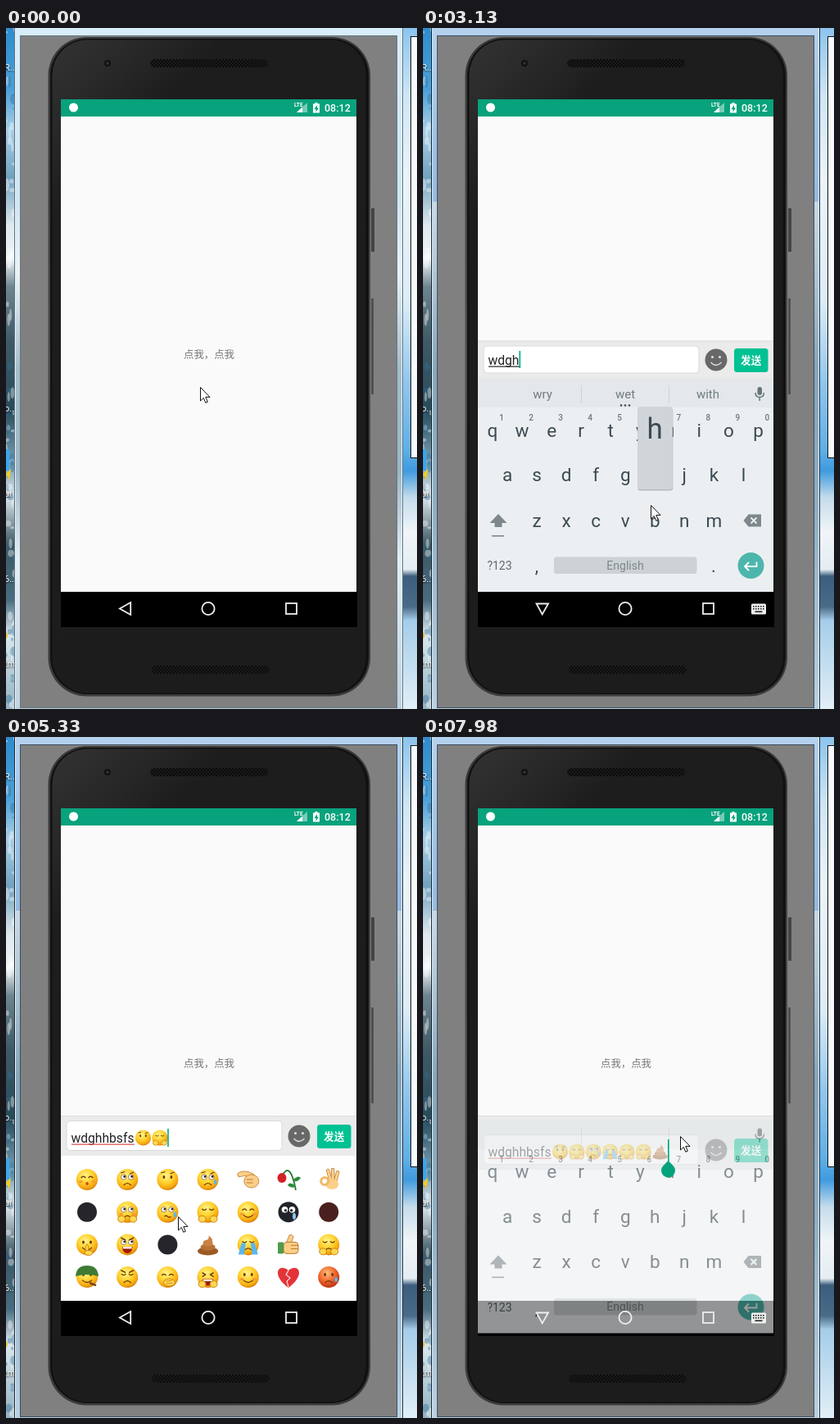
An HTML page that plays this animation: 502x831 px, repeating every 8 s.

```html
<!DOCTYPE html>
<html lang="zh">
<head>
<meta charset="utf-8">
<style>
html, body { margin: 0; width: 100%; height: 100%; overflow: hidden; background: #808080; }
svg { display: block; width: 502px; height: 831px; font-family: Roboto, "Noto Sans CJK SC", "Noto Sans CJK", sans-serif; }
</style>
</head>
<body>
<svg viewBox="0 0 502 831"><defs id="defs"></defs><g id="desk"></g><g id="phone"></g><g id="live"></g></svg>
<script>
const $ = id => document.getElementById(id);

// Shape helpers
const rect = (x, y, w, h, fill, more = '') => `<rect x="${x}" y="${y}" width="${w}" height="${h}" fill="${fill}" ${more}/>`;
const disc = (x, y, r, fill, more = '') => `<circle cx="${x}" cy="${y}" r="${r}" fill="${fill}" ${more}/>`;
const oval = (x, y, rx, ry, fill, more = '') => `<ellipse cx="${x}" cy="${y}" rx="${rx}" ry="${ry}" fill="${fill}" ${more}/>`;
const shape = (d, fill, more = '') => `<path d="${d}" fill="${fill}" ${more}/>`;
const line = (d, color, w = 1, more = '') => shape(d, 'none', `stroke="${color}" stroke-width="${w}" ${more}`);
const text = (x, y, s, size, fill, more = '') => `<text x="${x}" y="${y}" font-size="${size}" fill="${fill}" ${more}>${s}</text>`;
const mid = 'text-anchor="middle"';
const group = (s, more) => `<g ${more}>${s}</g>`;
const stops = s => s.split(' ').map(p => p.split('@')).map(([c, o]) => `<stop offset="${o}%" stop-color="${c}"/>`).join('');
const fade = (id, s, dir = 'x2="0" y2="1"') => `<linearGradient id="${id}" ${dir}>${stops(s)}</linearGradient>`;
const glow = (id, s) => `<radialGradient id="${id}" cx=".42" cy=".32" r=".7">${stops(s)}</radialGradient>`;

// Emoji, drawn around 0,0 with a radius of 13
const ink = '#6a3200';
const both = f => f(-4.5) + f(4.5);
const hand = (x, y, rx, ry) => oval(x, y, rx, ry, '#ffd84f', 'stroke="#c77a10" stroke-width=".9"');
const eyes = {
  o: both(x => oval(x, -3, 1.4, 2, ink)),
  w: both(x => disc(x, -3, 3.2, '#fff', `stroke="${ink}" stroke-width=".6"`) + disc(x + 1, -3.6, 1.4, '#222')),
  u: both(x => line(`M${x - 2.8} -2q2.8 -3.6 5.6 0`, ink, 1.3)),
  v: both(x => line(`M${x - 2.8} -4q2.8 3.2 5.6 0`, ink, 1.3)),
  x: line('M-7 -5.5l4 2.5l-4 2.5M7 -5.5l-4 2.5l4 2.5', ink, 1.4)
};
const mouths = {
  s: line('M-6 3.5q6 6 12 0', ink, 1.2),
  f: line('M-4.5 7q4.5 -5 9 0', ink, 1.2),
  k: oval(0, 5, 1.8, 2, '#d5461d'),
  l: line('M-4 5.5q2 -2 4 0t4 0', ink, 1.2),
  O: shape('M-6.5 2.5h13q-1 8 -6.5 8t-6.5 -8z', '#a3190c') + rect(-5.5, 2.8, 11, 2.2, '#fff'),
  n: ''
};
const extras = {
  h: hand(2, 6.5, 7, 4.5) + line('M-2 5l8 -1M-2 8l8 -1', '#c77a10', .8),
  H: hand(-7, 8.5, 4.5, 4) + hand(7, 8.5, 4.5, 4),
  i: hand(0, 6, 1.8, 6.5) + hand(2, 10, 5, 3),
  b: line('M-8 -8l5 -1.5M3 -7l5 -2', ink, 1.2),
  a: line('M-8 -8.5l6 3M8 -8.5l-6 3', ink, 1.5),
  d: oval(9, 3, 1.8, 3, '#5cb8ee'),
  t: shape('M-8 -2h5l-2 14h-7zM8 -2h-5l2 14h7z', '#59b8ee'),
  c: both(x => oval(x * 1.7, 2.5, 2.4, 1.6, '#f59a35')),
  g: shape('M-14 -1q1 -13 14 -13t14 13q-14 -4 -28 0z', '#3f7a35') + line('M3 7l8 3', '#704020', 2.4),
  r: ''
};
const face = code => disc(0, 0, 13, `url(#${code.includes('r') ? 'hot' : 'sun'})`) +
  eyes[code[0]] + mouths[code[1]] + [...code.slice(2)].map(c => extras[c]).join('');
const skin = (d, w) => line(d, '#b97830', w + 1.4, 'stroke-linecap="round"') + line(d, '#fbcf88', w, 'stroke-linecap="round"');
const objects = {
  FIST: skin('M-10 -6Q-4 -9 4 -5', 5) + oval(4, 2, 9, 8, '#fbcf88', 'stroke="#b97830" stroke-width=".8"') + line('M-2 0h8M-2 4h8', '#b97830'),
  ROSE: line('M-8 -4Q2 -24 9 13', '#267a38', 1.8) + shape('M6 0q6 -6 9 -2q-3 5 -8 4zM8 7q-7 -5 -9 0q4 4 9 2z', '#2c8a3e') + oval(-8, -2, 5.5, 6, '#d42027'),
  OK: skin('M2 0L-1 -11M5 0L5 -12M8 2L11 -9', 3) + oval(4, 6, 8, 6, '#fbcf88') + disc(-5, 2, 4.5, 'none', 'stroke="#f2b768" stroke-width="3"'),
  DARK: disc(0, 0, 12, '#25252b'),
  RUST: disc(0, 0, 12, '#49201d'),
  BALL: disc(0, 0, 12.5, '#20242a') + both(x => disc(x, -3, 3.8, '#fff') + disc(x * .8, -2, 1.6, '#111')) + oval(7, 5, 2, 4, '#8ec8ef'),
  POOP: oval(0, 8, 12.5, 5, '#9b5a24') + oval(0, 3, 9, 4.5, '#b87034') + oval(0, -2, 6, 4, '#c98242') + shape('M-4 -4Q2 -6 1 -11Q8 -6 4 -3z', '#c98242'),
  THUMB: skin('M0 -1L3 -9', 5) + rect(-6, -3, 18, 14, '#fbcf88', 'rx="4" stroke="#b97830"') + line('M3 1h9M3 5h9', '#b97830') + rect(-13, -3, 7, 14, '#4f9b4a', 'rx="1"'),
  HEART: shape('M0 13C-22 -3 -12 -18 0 -8C12 -18 22 -3 0 13z', '#e33438') + line('M0 -8l-3 5l5 4l-4 4l2 7', '#fbe3e3', 1.2),
  KID: rect(-8, 1, 16, 12, '#36a53c', 'rx="4"') + line('M-11 4H11', '#36a53c', 5, 'stroke-linecap="round"') + disc(0, -5, 8, 'url(#sun)') + both(x => disc(x / 2, -6, 1, ink))
};
const cells = ('ukc wfb ohb wfbd FIST ROSE OK DARK wfHc wld vhH usc BALL RUST osi wOa DARK POOP vft THUMB vfH ' +
  'osg vfa ulh xOH osc HEART ofrd ofar wOb uOc KID osH xOH wlad').split(' ');
const GIGGLE = 10, POOP = 17;
const inserted = [[30, 2], [31, GIGGLE], [34, 9], [36, 18], [41, GIGGLE], [43, GIGGLE], [45, POOP]];

$('defs').innerHTML =
  glow('sun', '#fff58c@0 #ffd12e@50 #f5a810@82 #cf7c08@100') +
  glow('hot', '#ffbf80@0 #f0662e@55 #b92f12@100') +
  fade('left', '#2f8ccd@0 #4ba0d8@9 #a9cfe6@15 #71a2bf@22 #dfe9ee@29 #eef3f5@34 #6d8590@38 #3f5a66@46 #284c5c@56 #6e97aa@63 #d8e3e8@69 #3c5764@76 #486d80@84 #dbe8ee@89 #93b2c2@100') +
  fade('right', '#8cc4ee@0 #cfe6f7@10 #eaf4fa@22 #dcedf8@40 #92c6ee@52 #5fafe6@62 #3f9ade@65 #c5dcec@69 #f0f5f8@74 #e4edf3@79.5 #3c5d7c@80.5 #4a6b88@85 #a5cde9@87 #e2eff7@100') +
  fade('idle', '#d8edfa@0 #cfe5f2@25 #eaf2f6@36 #a5bdca@50 #9eb6c5@65 #e3eef4@78 #bfd3df@100') +
  fade('busy', '#b4d1ee@0 #9dc2e6@15 #94bae0@25.5 #c8d9e6@25.5 #b3c8d6@35 #86a6bb@50 #8fadc1@70 #b9d1e2@100') +
  fade('body', '#333@0 #262626@14 #1d1d1d@22 #1c1c1c@100', 'x2=".5" y2="1"') +
  fade('edge', '#383838@0 #4a4a4a@50 #3a3a3a@100') +
  `<pattern id="mesh" width="4" height="4" patternUnits="userSpaceOnUse">${rect(0, 0, 4, 4, '#0c0c0c')}${disc(1, 1, .7, '#333')}${disc(3, 3, .7, '#333')}</pattern>` +
  `<clipPath id="screen">${rect(67, 87, 361, 644, '#fff')}</clipPath><clipPath id="grid">${rect(67, 520, 361, 159, '#fff')}</clipPath>` +
  cells.map((c, i) => group(objects[c] || face(c), `id="e${i}"`)).join('');

// Desktop and window frame
let seed = 7;
const random = () => (seed = seed * 16807 % 2147483647) / 2147483647;
const snow = Array.from({ length: 70 }, () =>
  oval(random() * 11, random() * 831, 1 + random() * 3, 1 + random() * 7, random() < .6 ? '#fff' : '#2c6f99', 'opacity=".4"')).join('');
const label = (y, s) => text(-2, y, s, 11, '#fff', 'style="text-shadow:0 1px 2px #000"');
const desk = active => rect(0, 0, 11, 831, 'url(#left)') + snow + rect(485, 0, 17, 831, 'url(#right)') +
  rect(-4, 514, 8, 26, '#39a7ef') + shape('M0 544l6 -6l-2 14z', '#f5cc1e') + disc(-3, 741, 5, '#f0bd28') +
  label(52, 'R..') + label(468, 'o..') + label(572, 'ar') + label(676, '6..') + label(780, 'tm') +
  rect(494.5, 10.5, 12, 514, '#f7fafc', 'stroke="#111"') +
  rect(10, 0, 475, 831, `url(#${active ? 'busy' : 'idle'})`) +
  line('M10.5 0V831M484.5 0V831', active ? '#1d2a35' : '#5d7482') +
  line('M11.5 0V831M483.5 0V831', '#e8f4fb') +
  rect(17.5, 9.5, 460, 820, '#808080', `stroke="${active ? '#3d4d5c' : '#66757f'}"`);

// Device and status bar
$('phone').innerHTML =
  rect(446, 220, 4, 53, '#444') + rect(446, 330, 3, 117, '#505050') +
  rect(51.5, 11, 393.5, 804.5, 'url(#edge)', 'rx="47"') +
  rect(54, 13, 389, 800, '#111', 'rx="45"') +
  rect(56.5, 14.5, 383, 797, 'url(#body)', 'rx="43"') +
  disc(124, 43, 4, '#111') + disc(124, 43, 1.8, '#343434') +
  rect(176, 38, 144, 10, 'url(#mesh)', 'rx="5"') + rect(178, 778, 144, 10, 'url(#mesh)', 'rx="5"') +
  rect(67, 87, 361, 21, '#08a27c') + rect(67, 108, 361, 580, '#fafafa') + rect(67, 688, 362, 43, '#000') +
  disc(82.5, 97, 5.5, '#fff') +
  text(352, 96, 'LTE', 6.5, '#fff', 'font-weight="700"') +
  shape('M355 103L368 91V103z', '#fff', 'opacity=".45"') + shape('M355 103L362 96.5V103z', '#fff') +
  shape('M375 92.5h2.5v-1.5h3v1.5h2.5v11h-8z', '#fff') + shape('M380 94l-3.5 5h2v3.5l3.5 -5h-2z', '#08a27c') +
  text(389, 102, '08:12', 12.5, '#fff', 'font-weight="500"') +
  text(217, 402.5, '点我，点我', 12.4, '#777');

// Soft keyboard
const rows = [['qwertyuiop', 85, 491], ['asdfghjkl', 103, 545.5], ['zxcvbnm', 139, 601]];
const keyAt = {};
rows.forEach(([keys, x, y]) => [...keys].forEach((k, i) => keyAt[k] = [x + 36.05 * i, y]));
const dark = '#3b4a52', soft = '#7d878c';
const keyboard = (words, popup) => {
  let s = rect(67, 427, 361, 261, '#eceff1') + rect(67, 427, 361, 36, '#e4e8ea') +
    line('M193.5 436V458M300.5 436V458', '#cdd3d6') +
    rect(408.5, 438, 5.5, 10, '#69757b', 'rx="2.7"') + line('M406 445q0 5.5 5.2 5.5t5.2 -5.5M411.2 450.5V455', '#69757b', 1.5);
  if (words) s += ['wry', 'wet', 'with'].map((w, i) => text(146 + 101 * i, 452, w, 15, '#707c82', mid)).join('') +
    [242, 247, 252].map(x => disc(x, 460.5, 1.3, dark)).join('');
  for (const k in keyAt) s += text(keyAt[k][0], keyAt[k][1] + 7.5, k, 22.5, dark, mid);
  for (let i = 0; i < 10; i++) s += text(96 + 36.05 * i, 479, (i + 1) % 10, 10, '#6d797f', mid + ' font-weight="500"');
  s += shape('M92 593L102.5 604H96.5V609H87.5V604H81.5z', soft) + rect(84, 619, 15, 1.6, soft) +
    shape('M391.5 601L397.5 593.5H413V608.5H397.5z', soft) + line('M400.5 597.5l7 7m0 -7l-7 7', '#eceff1', 1.8) +
    text(93.5, 661, '?123', 14, '#5c686e', mid) + text(139, 664, ',', 22, dark, mid) + text(355, 664, '.', 22, dark, mid) +
    rect(160, 645.5, 174.5, 20.5, '#cdd2d4', 'rx="3"') + text(247, 660.5, 'English', 14, soft, mid) +
    disc(400.5, 656, 16, '#4db6ac') + line('M407.5 651.5V657H393.5M398 652l-5 5l5 5', '#fff', 1.8);
  if (popup) {
    const [x, y] = keyAt[popup];
    s += rect(x - 21, y - 82, 43, 101, '#9da6aa', 'rx="3" opacity=".7"') + rect(x - 21, y - 83.5, 42.5, 101, '#cfd5d8', 'rx="3"') +
      text(x, y - 45, popup, 35, dark, mid);
  }
  return s;
};

// Input bar; h is its height and shift pushes the content down
const advance = { w: .751, d: .564, g: .561, h: .551, b: .561, s: .516, f: .348 };
const bar = (top, h, typed, icons, underline, shift) => {
  const c = top + h / 2 + shift, side = Math.ceil(c), fieldH = h - 13;
  const base = c + (icons.length ? 8.5 : 6.5);
  const width = [...typed].reduce((sum, k) => sum + advance[k] * 15.65, 0);
  return rect(67, top, 361, h + shift, '#ebebeb') + rect(67, top, 361, 1, '#dedede') +
    rect(74, c - fieldH / 2, 263, fieldH, '#fff', 'rx="4" stroke="#d9d9d9"') +
    text(79.5, base, typed, 15.65, '#222') +
    (underline ? rect(80, base + 1.5, width, 1.2, underline) : '') +
    icons.map((id, i) => `<use href="#e${id}" transform="translate(${167.5 + 20.35 * i} ${base - 6}) scale(.74)"/>`).join('') +
    rect(79.5 + width + icons.length * 20.35, base - 17, 1.6, icons.length ? 22 : 21, '#00a982') +
    disc(358, side, 13.5, '#686868') + both(x => disc(358 + x, side - 3.5, 1.6, '#ddd')) + line(`M351.5 ${side + 3}q6.5 7 13 0`, '#ddd', 1.3) +
    rect(380, side - 14, 41.5, 29, typed ? '#00c193' : '#ebebeb', `rx="3.5" ${typed ? '' : 'stroke="#a5a5a5"'}`) +
    text(400.7, side + 5, '发送', 12.6, typed ? '#fff' : '#999', mid + ' font-weight="700"');
};

const panel = scroll => group(cells.map((_, i) =>
  `<use href="#e${i}" x="${99 + 49.2 * (i % 7)}" y="${540 + 39.7 * Math.floor(i / 7) - scroll}"/>`).join(''), 'clip-path="url(#grid)"');

const nav = typing => {
  let s = line(typing ? 'M138.5 702.5H153L145.7 715.5z' : 'M138.9 708.5L152.2 701V716z', '#eee', 1.8) +
    disc(247, 708.5, 7.6, 'none', 'stroke="#eee" stroke-width="1.8"') + rect(342, 702, 13, 13, 'none', 'stroke="#eee" stroke-width="1.8"');
  if (typing) {
    s += rect(401, 702.5, 18, 13, '#eee', 'rx="1.5"') + rect(405.5, 711.5, 9, 1.6, '#222');
    for (let i = 0; i < 10; i++) s += rect(403 + 3 * (i % 5), 705 + 3 * (i > 4), 1.6, 1.6, '#222');
  }
  return s;
};

// Linear interpolation over points [step, value, ...]
const along = (points, n) => {
  let i = points.findIndex(p => p[0] > n);
  if (i < 0) return points.at(-1).slice(1);
  if (!i) return points[0].slice(1);
  const a = points[i - 1], b = points[i], k = (n - a[0]) / (b[0] - a[0]);
  return a.slice(1).map((v, j) => v + (b[j + 1] - v) * k);
};
const pointer = [[-2, 237, 438], [-1, 237, 454], [0, 237, 454], [3, 243, 405], [8, 250, 420], [10, 121, 492], [12, 175, 547], [14, 247, 547],
  [15, 283, 547], [16, 278, 582], [17, 283, 549], [18, 283, 600], [19, 139, 547], [20, 211, 547], [21, 139, 547], [22, 355, 408],
  [24, 352, 440], [26, 323, 577], [28, 260, 585], [30, 195, 540], [31, 245, 580], [32, 210, 585], [33, 197, 582], [35, 290, 615],
  [36, 290, 612], [38, 275, 562], [39, 275, 562], [41, 243, 552], [43, 243, 552], [45, 240, 585], [47, 343, 520], [49, 314, 487]];
const barTop = [[5, 641.5], [6, 641.5], [7, 500], [8, 393], [9, 381.5], [22, 381.5], [23, 405], [24, 560], [25, 630], [26, 641.5]];
const sheet = [[6, 40, .5], [7, 12, .85], [8, 1.5, 1], [9, 0, 1], [21, 0, 1], [22, 12, .85], [23, 40, .4]];
const strokes = [[10, 'w'], [12, 'd'], [14, 'g'], [16, 'h'], [17, 'h'], [18, 'b'], [19, 's'], [20, 'f'], [21, 's']];

const draw = n => {
  const typed = strokes.filter(s => s[0] <= n).map(s => s[1]).join('');
  const popup = (strokes.find(s => s[0] === n) || [])[1];
  const icons = inserted.filter(e => e[0] <= n).map(e => e[1]);
  const late = n >= 51, typing = n >= 6 && n < 24 || late;
  let s = '';
  if (n >= 5) {
    const h = icons.length ? 49 : 46, open = n >= 28;
    if (open) s += rect(67, 511, 361, 177, '#fff');
    if (open && n < 50) s += panel(along([[35, 0], [38, 28]], n)[0]);
    const underline = n < 22 ? '#222' : icons.length ? '#e04848' : '';
    s += bar(open ? 511 - h : along(barTop, n)[0], h, typed, icons, underline, late ? 17 : 0);
  }
  if (typing) {
    const [dy, alpha] = late ? [39.5, .62] : along(sheet, n);
    s += group(keyboard(n >= 10 && n < 22, popup), `transform="translate(0 ${dy})" opacity="${alpha}"`);
  }
  s += nav(typing);
  if (n >= 50) {
    const y = late ? 518 : 501;
    s += rect(299, y - 27, 1.6, 27, '#00a982') + shape(`M299.5 ${y - 1}L305.5 ${y + 5}A8.5 8.5 0 1 1 293.5 ${y + 5}z`, '#05a37d');
  }
  const [x, y] = along(pointer, n).map(Math.round);
  $('desk').innerHTML = desk(n >= 0);
  $('live').innerHTML = group(s, 'clip-path="url(#screen)"') +
    group(shape('M.5 .5V17L4.3 13.4L6.8 19.3L9.3 18.2L6.8 12.4H12z', '#fff', 'stroke="#111"'), `transform="translate(${x} ${y})"`);
};

const spans = [900, 2020, 3130, 4220, 5330, 6390, 7550, 8695];
const stepAt = t => {
  if (t < 900) return t < 620 ? -2 : -1;
  const i = spans.findIndex(v => v > t) - 1;
  return i * 8 + Math.floor((t - spans[i]) / (spans[i + 1] - spans[i]) * 8 + .01);
};

let shown;
const start = performance.now();
const tick = () => {
  const n = stepAt((performance.now() - start) % 8000);
  if (n !== shown) draw(shown = n);
  requestAnimationFrame(tick);
};
tick();
</script>
</body>
</html>
```
